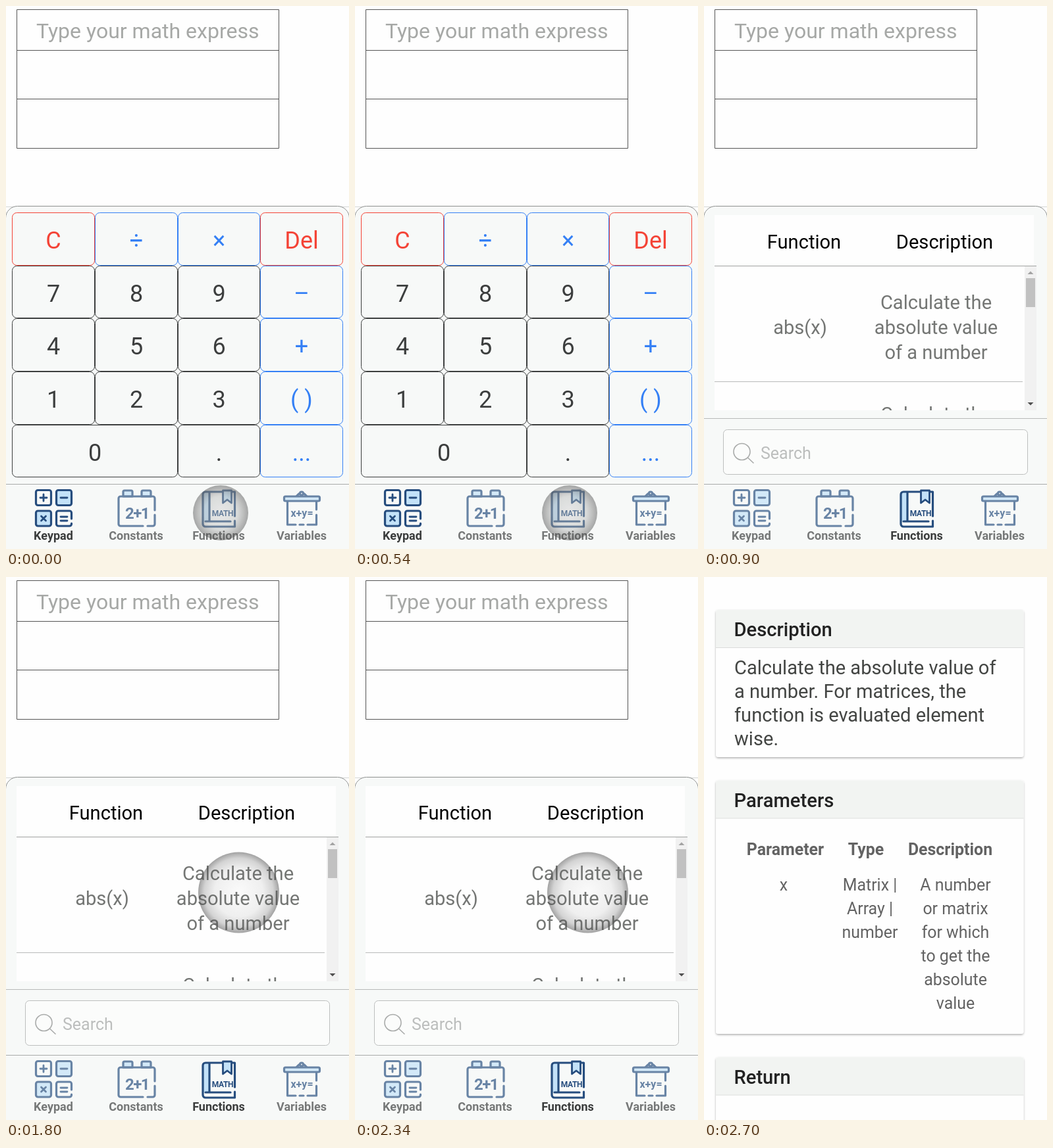
An HTML page that plays this animation: 521 by 826 pixels, repeating every 3600 ms.

```html
<!DOCTYPE html>
<html lang="en">
<head>
<meta charset="utf-8">
<title>Math calculator</title>
<style>
  html, body { margin: 0; width: 100%; height: 100%; overflow: hidden; background: #fefefe; }
  svg { display: block; font-family: Roboto, sans-serif; }
  .mid { text-anchor: middle; }
  .line { fill: none; stroke-width: 1; }
  .key { font-size: 36px; text-anchor: middle; }
  .body { font-size: 29.1px; }
  .cell { font-size: 24.9px; fill: #636363; text-anchor: middle; }
  .bold { font-weight: 700; }
  .title { font-size: 29.2px; font-weight: 500; fill: #222; }
  .icon { fill: none; stroke: #264d7e; stroke-width: 3.2; stroke-linecap: round; stroke-linejoin: round; }
  .icon text { fill: #264d7e; stroke: none; font-weight: 700; text-anchor: middle; }
  .tint { fill: #c3e2f8; }
  .tab { opacity: .68; }
  .label { font-size: 18px; font-weight: 700; fill: #3a3c3c; text-anchor: middle; }

  .scene, .tab { animation: 3.6s step-end infinite; }
  .calc { animation-name: calc; }
  .keypad { animation-name: keypad; }
  .list { animation-name: list; }
  .tap { animation-name: tap; }
  .detail { animation-name: detail; }
  .first { animation-name: first; }
  .third { animation-name: third; }
  @keyframes calc { 0% { visibility: visible } 75%, 100% { visibility: hidden } }
  @keyframes keypad { 0% { visibility: visible } 25%, 100% { visibility: hidden } }
  @keyframes list { 0% { visibility: hidden } 25% { visibility: visible } 75%, 100% { visibility: hidden } }
  @keyframes tap { 0% { visibility: hidden } 50% { visibility: visible } 75%, 100% { visibility: hidden } }
  @keyframes detail { 0% { visibility: hidden } 75%, 100% { visibility: visible } }
  @keyframes first { 0% { opacity: 1 } 25%, 100% { opacity: .68 } }
  @keyframes third { 0% { opacity: .68 } 25%, 100% { opacity: 1 } }
</style>
</head>
<body>
<svg width="521" height="826" viewBox="0 0 521 826">
  <defs>
    <radialGradient id="press">
      <stop offset="0" stop-color="#555" stop-opacity=".1"/>
      <stop offset=".6" stop-color="#555" stop-opacity=".18"/>
      <stop offset="1" stop-color="#444" stop-opacity=".46"/>
    </radialGradient>
    <radialGradient id="touch">
      <stop offset="0" stop-color="#555" stop-opacity=".02"/>
      <stop offset=".6" stop-color="#555" stop-opacity=".09"/>
      <stop offset=".85" stop-color="#555" stop-opacity=".25"/>
      <stop offset="1" stop-color="#444" stop-opacity=".5"/>
    </radialGradient>
    <filter id="shadow" x="-5%" y="-5%" width="110%" height="115%">
      <feDropShadow dx="0" dy="1.5" stdDeviation="1.6" flood-opacity=".32"/>
    </filter>
    <clipPath id="rows"><path d="M16 396H487V615H16Z"/></clipPath>
  </defs>

  <g class="scene calc">
    <path class="line" stroke="#555" d="M16.5 5.5H414.5V216.5H16.5ZM16.5 67.5H414.5M16.5 141.5H414.5"/>
    <text x="46" y="49" font-size="32" fill="#a6a8a6">Type your math express</text>
    <path class="line" stroke="#d4d6d5" d="M0 305.5H521"/>
    <rect x="-.5" y="304.5" width="522" height="540" rx="18" fill="#f7f9f8" stroke="#8e908f"/>
  </g>

  <g class="scene keypad" id="keys"></g>

  <g class="scene list">
    <path fill="#fefefe" d="M16 318H501V395H487V615H16Z"/>
    <g class="body mid">
      <text x="152" y="369">Function</text>
      <text x="365.5" y="369">Description</text>
      <g fill="#747674">
        <text x="146" y="499">abs(x)</text>
        <text x="352.5" y="461">Calculate the</text>
        <text x="352.5" y="499">absolute value</text>
        <text x="352.5" y="537">of a number</text>
        <text x="352.5" y="631" clip-path="url(#rows)">Calculate the</text>
      </g>
    </g>
    <path fill="#f1f1f1" d="M487 396H505V615H487Z"/>
    <path fill="#c1c1c1" d="M489 414H503V458H489Z"/>
    <path fill="#a3a3a3" d="M491.5 408H500.5L496 403.5Z"/>
    <path fill="#505050" d="M491.5 603H500.5L496 607.5Z"/>
    <path class="line" stroke="#a0a2a1" d="M16 395.5H505"/>
    <path class="line" stroke="#b8bab9" d="M16 571.5H484M0 627.5H521"/>
    <rect x="29.5" y="644.5" width="462" height="68" rx="6" fill="#fbfcfb" stroke="#bdbfbe"/>
    <path fill="none" stroke="#a9abaa" stroke-width="1.6" d="M45 678a12.5 12.5 0 1 0 25 0a12.5 12.5 0 1 0 -25 0M66.5 687L75.500 695.500"/>
    <text x="86" y="689" font-size="25" fill="#bcbebd">Search</text>
  </g>

  <g class="scene calc">
    <path class="line" stroke="#a9abaa" d="M0 727.5H521"/>
    <g class="tab first">
      <g class="icon">
        <rect x="45.500" y="736.500" width="23" height="23" rx="3"/>
        <rect class="tint" x="76.500" y="736.500" width="23" height="23" rx="3"/>
        <rect class="tint" x="45.500" y="768" width="23" height="23" rx="3"/>
        <path d="M99.500 780V771a3 3 0 0 0 -3-3H79.500a3 3 0 0 0 -3 3V788a3 3 0 0 0 3 3H96.500a3 3 0 0 0 3-3V787"/>
        <path stroke-width="2.800" d="M52 748H62M57 743V753M83 748H93M53.500 776L60.500 783M60.500 776L53.500 783M83 777H93M83 783H93"/>
      </g>
      <text class="label" x="72" y="812">Keypad</text>
    </g>
    <g class="tab">
      <g class="icon">
        <path class="tint" d="M178 746V739a2 2 0 0 1 2-2H190a2 2 0 0 1 2 2V746ZM206 746V739a2 2 0 0 1 2-2H218a2 2 0 0 1 2 2V746Z"/>
        <path d="M226 767V749a3 3 0 0 0 -3-3H174a3 3 0 0 0 -3 3V788a3 3 0 0 0 3 3H208M215 791H223a3 3 0 0 0 3-3V774"/>
        <text x="199" y="780" font-size="24" letter-spacing="-1.500">2+1</text>
      </g>
      <text class="label" x="197.500" y="812">Constants</text>
    </g>
    <g class="tab third">
      <g class="icon">
        <path class="tint" stroke="none" d="M300 740H309V784H300Z"/>
        <path d="M329 739H303a4 4 0 0 0 -4 4V788a4 4 0 0 0 4 4H347.500V783M343 739H347.500V776M309 740V783M303 784H341"/>
        <path class="tint" stroke-width="2.800" d="M329.500 737H342.500V756L336 751L329.500 756Z"/>
        <text x="329" y="776" font-size="12" letter-spacing="-.4">MATH</text>
      </g>
      <text class="label" x="323" y="812">Functions</text>
    </g>
    <g class="tab">
      <g class="icon" stroke-width="2.800">
        <path d="M441 746L445 742M457 746L453 742"/>
        <circle cx="449" cy="741.500" r="2.500"/>
        <rect class="tint" x="422.500" y="746" width="54" height="7" rx="2"/>
        <path d="M427.500 754V789H440M471.500 754V766M471.500 774V789H458M446 789H452"/>
        <text x="449.500" y="777" font-size="16">x+y=</text>
      </g>
      <text class="label" x="449" y="812">Variables</text>
    </g>
  </g>

  <circle class="scene keypad" cx="326" cy="771" r="42" fill="url(#press)"/>
  <circle class="scene tap" cx="353.500" cy="480" r="61.500" fill="url(#touch)"/>

  <g class="scene detail">
    <g id="cards"></g>
    <g class="body" fill="#434543">
      <text x="46" y="148">Calculate the absolute value of</text>
      <text x="46" y="184">a number. For matrices, the</text>
      <text x="46" y="220">function is evaluated element</text>
      <text x="46" y="256">wise.</text>
    </g>
    <g class="cell" id="table"></g>
  </g>
</svg>
<script>
  const put = (id, html) => document.getElementById(id).insertAdjacentHTML('beforeend', html);

  const red = '#f44336', blue = '#3580f5', dark = '#3c3e3e';
  const cols = [9.5, 135.5, 261.5, 386.5, 512.5];
  const rows = [314.5, 395.5, 475.5, 556.5, 637.5, 717.5];
  const layout = [['C', '÷', '×', 'Del'], ['7', '8', '9', '–'], ['4', '5', '6', '+'],
                  ['1', '2', '3', '( )'], ['0', '', '.', '...']];
  layout.forEach((row, r) => row.forEach((name, c) => {
    if (!name) return;
    const x = cols[c], y = rows[r];
    const w = cols[c + (name === '0' ? 2 : 1)] - x - 1, h = rows[r + 1] - y - 1;
    const color = /[CD]/.test(name) ? red : r === 0 || c === 3 ? blue : dark;
    put('keys', `<rect x="${x}" y="${y}" width="${w}" height="${h}" rx="7" fill="none" stroke="${color}"/>
      <text class="key" x="${x + w / 2}" y="${y + 54}" fill="${color}">${name}</text>`);
  }));

  const card = (title, y, h) => put('cards', `
    <rect x="18" y="${y}" width="467.5" height="${h}" rx="4" fill="#fefefe" filter="url(#shadow)"/>
    <path fill="#f2f4f2" d="M18 ${y + 57}V${y + 4}q0 -4 4 -4H481.500q4 0 4 4V${y + 57}Z"/>
    <path class="line" stroke="#dadcda" d="M18 ${y + 57.5}H485.500"/>
    <text class="title" x="45.500" y="${y + 40}">${title}</text>`);
  card('Description', 50, 224);
  card('Parameters', 309.5, 385.5);
  card('Return', 730.5, 200);

  const column = (x, y, lines, cls = '') => lines.forEach((line, i) =>
    put('table', `<text class="${cls}" x="${x}" y="${y + i * 36}">${line}</text>`));
  column(123.5, 423, ['Parameter'], 'bold');
  column(246, 423, ['Type'], 'bold');
  column(374, 423, ['Description'], 'bold');
  column(121, 477, ['x']);
  column(252, 477, ['Matrix |', 'Array |', 'number']);
  column(382, 477, ['A number', 'or matrix', 'for which', 'to get the', 'absolute', 'value']);
</script>
</body>
</html>
```
